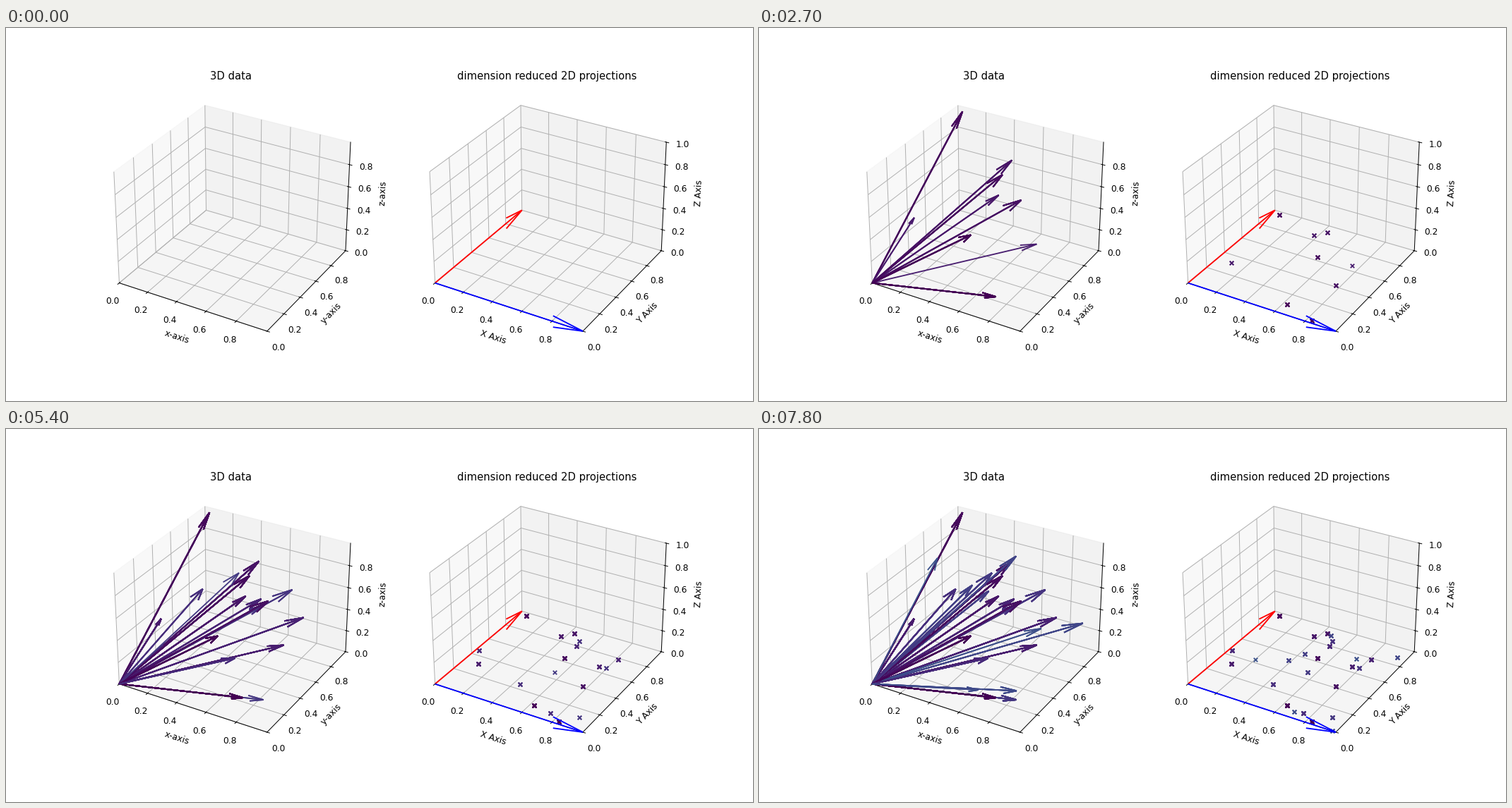
Write a matplotlib script that moves like this. It is 1058 px wide and 529 px high and loops after 8 s.

```python
import numpy as np
import matplotlib.pyplot as plt
from matplotlib.animation import FuncAnimation

STEP_MS, TICK_MS, LOOP_MS = 300, 100, 8000
TOTAL = 100  # length of the full colour scale

POINTS = np.array([
    (.828, .026, .214), (.625, .097, .625), (.055, .963, .982),
    (.523, .637, .764), (.771, .415, .773), (.428, .923, .685),
    (.374, .856, .382), (.099, .322, .420), (.750, .656, .203),
    (.814, .782, .398), (.516, .796, .448), (.021, .452, .050),
    (.748, .075, .495), (.438, .245, .864), (.503, .857, .351),
    (.795, .664, .721), (.908, .121, .158), (.547, .470, .902),
    (.430, .636, .591), (.381, .527, .697), (.462, .912, .749),
    (.938, .891, .320), (.974, .002, .357), (.695, .057, .203),
    (.729, .751, .284), (.199, .436, .930),
])
COLORS = plt.cm.viridis(np.arange(len(POINTS)) / TOTAL)

fig = plt.figure(figsize=(12, 6), dpi=88.16667)


def make_axes(pos, title, labels, zticks):
    ax = fig.add_subplot(pos, projection="3d")
    ticks = np.arange(0, 1, 0.2)
    ax.set_xticks(ticks)
    ax.set_yticks(ticks)
    ax.set_zticks(zticks)
    ax.set(xlim=(0, 1), ylim=(0, 1), zlim=(0, 1), title=title)
    ax.set_xlabel(labels[0])
    ax.set_ylabel(labels[1])
    ax.set_zlabel(labels[2])
    return ax


def arrow(ax, vec, color, head, n=1):
    """Draw an arrow from the origin n times over itself."""
    o = np.zeros(n)
    u, v, w = (np.full(n, c) for c in vec)
    return ax.quiver(o, o, o, u, v, w, color=color, arrow_length_ratio=head)


left = make_axes(121, "3D data", ("x-axis", "y-axis", "z-axis"),
                 np.arange(0, 1, 0.2))
right = make_axes(122, "dimension reduced 2D projections",
                  ("X Axis", "Y Axis", "Z Axis"), np.linspace(0, 1, 6))
arrow(right, (1, 0, 0), "blue", 0.2)
arrow(right, (0, 1, 0), "red", 0.2)

drawn = []


def update(i):
    while drawn:
        drawn.pop().remove()
    shown = i * TICK_MS // STEP_MS
    for j in range(min(shown, len(POINTS))):
        # every step paints all earlier points again, so edges harden with age
        n = shown - j
        x, y, _ = POINTS[j]
        drawn.append(arrow(left, POINTS[j], COLORS[j], 0.1, n))
        drawn.append(right.scatter(np.full(n, x), np.full(n, y), np.zeros(n),
                                   marker="x", color=COLORS[j],
                                   depthshade=False))
    return drawn


anim = FuncAnimation(fig, update, frames=LOOP_MS // TICK_MS,
                     interval=TICK_MS, repeat=True, repeat_delay=0)
plt.show()
```
